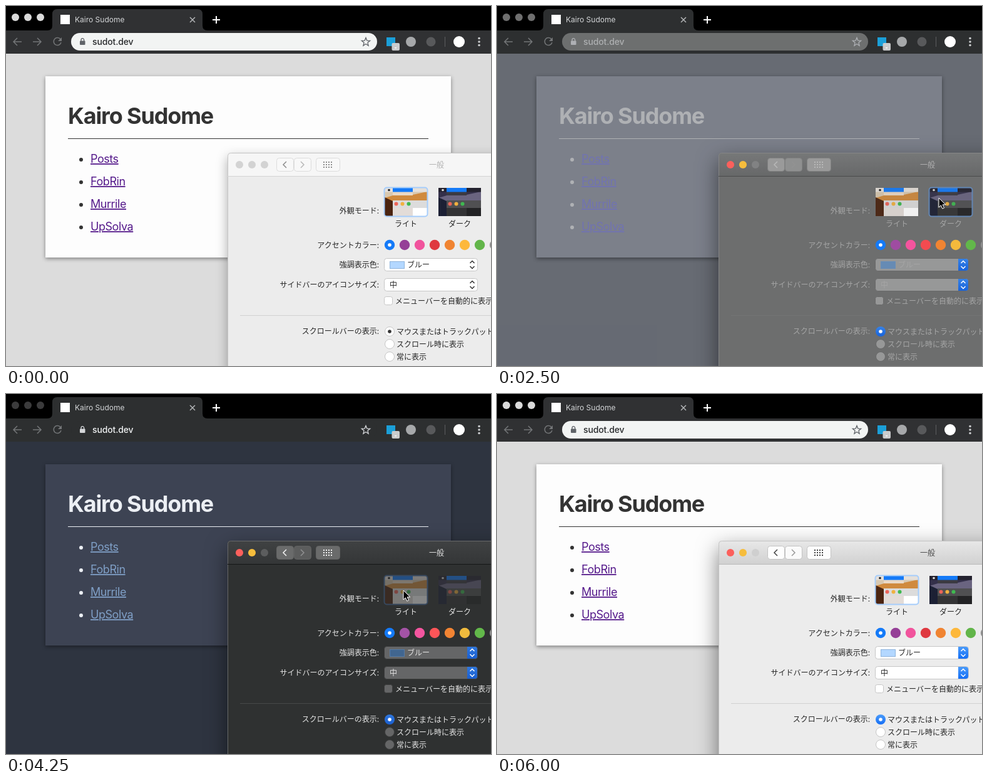
Animation of 775 by 574 pixels, one loop 7250 ms. Source, as an HTML page:

```html
<!DOCTYPE html>
<html lang="ja">
<head>
<meta charset="utf-8">
<title>Light and dark appearance</title>
<style>
  html, body { margin: 0; width: 100%; height: 100%; overflow: hidden; background: #000; }
  svg { display: block; width: 775px; height: 574px; }
  text { font: 12px Inter, sans-serif; white-space: pre; }
  .ja { font-family: "Noto Sans CJK JP", "Noto Sans CJK", sans-serif; font-weight: 500; }
  .link { font-size: 18px; letter-spacing: -.025em; text-decoration: underline; text-decoration-thickness: 1px; text-underline-offset: 2px; }
  .title { font-size: 36px; font-weight: 700; letter-spacing: -.032em; }
  .url { font-size: 14px; font-weight: 500; letter-spacing: -.01em; }
</style>
</head>
<body>
<svg id="stage" viewBox="0 0 775 574"></svg>
<script>
const light = {
  id: 'light', lamp: '#dadada', bar: '#303133', omni: '#f2f4f3', url: '#26282a', icon: '#5f6368',
  page: '#dcdcdc', card: '#fdfdfd', cardShadow: .42, ink: '#333', link: '#551a8b',
  head: ['#e8e8e8', '#d1d1d1'], edge: '#b9b9b9', rim: '#c4c4c4', panel: '#ececec', rule: '#d1d1d1',
  title: '#4c4c4c', label: '#262626', off: '#cfcfcf', button: ['#fdfdfd', '#fafafa'], buttonEdge: '#c3c3c3',
  glyph: ['#444', '#9a9a9a'], field: '#fff', fieldEdge: '#c6c6c6', blue: ['#4a9bfa', '#146ef5'],
  swatch: '#b3d7ff', swatchEdge: '#8fb4dc', ring: '#a6cdfb',
  accents: ['#147af8', '#953f97', '#f1549d', '#df3940', '#f08432', '#fdb83b', '#62b54a', '#8f8f8f']
};
const dark = {
  id: 'dark', lamp: '#3b3b3c', bar: '#2d2f30', omni: '#2d2f30', url: '#f1f3f4', icon: '#d5d7da',
  page: '#2e3440', card: '#3d4353', cardShadow: .4, ink: '#eceff4', link: '#7f9fc6',
  head: ['#404243', '#343637'], edge: '#151616', rim: '#68696a', panel: '#2f3131', rule: '#474949',
  title: '#e2e2e2', label: '#e4e4e4', off: '#5c5d5e', button: ['#6a6b6b', '#5c5d5d'], buttonEdge: '#626363',
  glyph: ['#f2f2f2', '#8f9091'], field: '#656667', fieldEdge: '#3c3d3d', blue: ['#2f77dd', '#1a5fd0'],
  swatch: '#416690', swatchEdge: '#567ba6', ring: '#42699c',
  accents: ['#147af8', '#a453a6', '#f4559f', '#fc5558', '#f28433', '#f0bb3d', '#62b84a', '#8f8f8f']
};
// Inactive window chrome
const idle = {
  ...light, head: ['#f6f6f6', '#f6f6f6'], edge: '#d4d4d4', title: '#b2b2b2', off: '#d3d3d3',
  button: ['#f8f8f8', '#f8f8f8'], buttonEdge: '#dcdcdc', glyph: ['#8d8d8d', '#b9b9b9']
};

// start, pointer x, y, darkness, thumbnail opacity, selected mode, window active
const steps = [
  [0, -50, 0, 0, 1, 0, 0],
  [250, 774, 183, 0, 1, 0, 0],
  [500, 717, 228, 0, 1, 0, 0],
  [750, 631, 302, 0, 1, 0, 0],
  [1000, 621, 313, 0, 1, 0, 0],
  [1500, 689, 308, 0, 1, 0, 0],
  [1750, 705, 305, 0, 1, 0, 0],
  [2000, 705, 305, 0, .46, 1, 1],
  [2500, 705, 305, .67, .9, 1, 1],
  [2750, 705, 305, .98, 1, 1, 1],
  [3000, 697, 305, 1, 1, 1, 1],
  [3250, 634, 312, 1, 1, 1, 1],
  [4000, 634, 312, 1, .42, 0, 1],
  [4750, 634, 312, .2, 1, 0, 1],
  [5000, 634, 312, 0, 1, 0, 1],
  [5250, 656, 313, 0, 1, 0, 1],
  [5500, 697, 317, 0, 1, 0, 1],
  [5750, 716, 311, 0, 1, 0, 1],
  [6000, -50, 0, 0, 1, 0, 1]
];

const rect = (x, y, w, h, fill, r = 0, more = '') =>
  `<rect x="${x}" y="${y}" width="${w}" height="${h}" rx="${r}" fill="${fill}" ${more}/>`;
const disc = (x, y, r, fill, more = '') => `<circle cx="${x}" cy="${y}" r="${r}" fill="${fill}" ${more}/>`;
const line = (d, color, w = 1.5) => `<path d="${d}" fill="none" stroke="${color}" stroke-width="${w}"/>`;
const text = (x, y, str, fill, cls = '', anchor = 'start') =>
  `<text x="${x}" y="${y}" class="${cls}" fill="${fill}" text-anchor="${anchor}">${str}</text>`;
const ja = (x, mid, str, fill, anchor) => text(x, mid + 4.5, str, fill, 'ja', anchor);
const fade = (id, [a, b]) => `<linearGradient id="${id}" x2="0" y2="1"><stop stop-color="${a}"/>
  <stop offset="1" stop-color="${b}"/></linearGradient>`;
const shadow = (y, blur, a) => `style="filter:drop-shadow(0 ${y}px ${blur}px rgba(0,0,0,${a}))"`;

function browser(p) {
  const gray = '#737577';
  const star = Array.from({ length: 10 }, (_, i) => {
    const r = i % 2 ? 3 : 7, a = i * Math.PI / 5;
    return `${(575 + r * Math.sin(a)).toFixed(1)},${(57.5 - r * Math.cos(a)).toFixed(1)}`;
  }).join(' ');
  return rect(0, 0, 775, 39, '#000') + [15, 35, 55].map(x => disc(x, 18, 6, p.lamp)).join('') +
    `<path d="M66 39q8 0 8-8V13q0-8 8-8H306q8 0 8 8V31q0 8 8 8z" fill="${p.bar}"/>` +
    rect(87, 14, 15, 15, '#fff') + text(110, 26, 'Kairo Sudome', '#d3d5d7') +
    line('M294 18l8 8m0-8l-8 8', '#b4b6b8') + line('M330 22h12m-6-6v12', '#fff', 2) +
    rect(0, 39, 775, 37, p.bar) +
    line('M25 57H12m6-6l-6 6 6 6M43 57H56m-6-6l6 6-6 6', gray) +
    line('M87 53a6 6 0 1 0 1 5', gray) + `<path d="M89 50v6h-6z" fill="${gray}"/>` +
    rect(104, 43, 489, 28, p.omni, 14) +
    rect(118, 55.5, 8.5, 6.5, p.icon, 1) + line('M120 56v-2a2.3 2.3 0 0 1 4.6 0v2', p.icon, 1.3) +
    text(138, 62, 'sudot.dev', p.url, 'url') +
    `<polygon points="${star}" fill="none" stroke="${p.icon}" stroke-width="1.3"/>` +
    rect(608, 50, 14, 14, '#1b9fd8') + rect(616.5, 59, 12.5, 12, '#cbcccd', 2) + rect(621, 66, 3, 1.5, '#fff') +
    disc(647, 57, 8, '#a6a8aa') + disc(679, 57, 7.5, '#58595b') + rect(701, 49, 1, 16, '#5c5d5f') +
    disc(724, 57, 9, '#fff') + [51.5, 57, 62.5].map(y => disc(756, y, 1.8, '#c9cbcd')).join('');
}

function page(p) {
  const links = ['Posts', 'FobRin', 'Murrile', 'UpSolva'];
  return rect(0, 76, 775, 498, p.page) +
    rect(63, 112, 648, 289, p.card, 0, shadow(2, 3, p.cardShadow)) +
    text(99, 188, 'Kairo Sudome', p.ink, 'title') + rect(99, 211, 576, 1, p.ink) +
    links.map((s, i) => disc(120, 245 + i * 36, 3, p.ink) + text(135, 250 + i * 36, s, p.link, 'link')).join('');
}

// A small desktop: wallpaper, open menu and a window
function thumb(x, night) {
  const [sky, hill, cliff, bar, menu, head, side, pane] = night
    ? ['#34304a', '#6a6480', '#1c2034', '#24222f', '#3b3a42', '#505052', '#333335', '#232325']
    : ['#d8c8b0', '#d08a3e', '#4b2410', '#e6e0da', '#ead9c6', '#dcdcdc', '#e3dcd8', '#fff'];
  return `<svg x="${x}" y="290" width="68" height="45" viewBox="0 0 68 45">` +
    rect(0, 0, 68, 45, sky) +
    `<path d="M0 16L20 10 40 12 68 6V45H0z" fill="${hill}"/><path d="M0 15L13 21V45H0z" fill="${cliff}"/>` +
    rect(0, 0, 68, 6.5, bar) + disc(7, 3.5, 1.8, night ? '#ddd' : '#222') +
    rect(13, 6, 32, 6, menu) + rect(13, 0, 32, 6.5, '#147af8') +
    rect(13, 20, 55, 12, head) + rect(13, 32, 32, 13, side) + rect(45, 32, 23, 13, pane) +
    ['#ec6459', '#f0b13f', '#3fb950'].map((c, i) => disc(18.5 + i * 10, 25.5, 3, c)).join('') + '</svg>';
}

function select(y, p, active) {
  return rect(604.5, y - 10, 149, 20, p.field, 4, `stroke="${p.fieldEdge}"`) +
    (active ? `<path d="M737 ${y - 9.5}h12q4 0 4 4v11q0 4-4 4h-12z" fill="url(#${p.id}Blue)"/>` : '') +
    line(`M741.5 ${y - 2.5}l3.5-3.5 3.5 3.5M741.5 ${y + 2.5}l3.5 3.5 3.5-3.5`, active ? '#fff' : '#333');
}

function prefs(p, dim, chosen, active) {
  const rim = `stroke="${p.fieldEdge}"`;
  const labels = [[326, '外観モード:'], [381, 'アクセントカラー:'], [412.5, '強調表示色:'],
    [444.5, 'サイドバーのアイコンサイズ:'], [518.5, 'スクロールバーの表示:']];
  const radios = ['マウスまたはトラックパッド', 'スクロール時に表示', '常に表示'];
  const lamps = active ? ['#fc605c', '#f6bd3c', p.off] : [p.off, p.off, p.off];
  const button = (x, w, i) => rect(x + .5, 242.5, w - 1, 21, p.button[i], 4, `stroke="${p.buttonEdge}"`);
  let dots = '';
  for (let i = 0; i < 12; i++) dots += rect(507 + i % 4 * 4, 248 + (i >> 2) * 4, 2, 2, p.glyph[0]);

  return `<defs>${fade(p.id + 'Head', p.head)}${fade(p.id + 'Blue', p.blue)}</defs>` +
    rect(354, 234, 480, 400, p.panel, 5, active ? shadow(12, 17, .5) : shadow(7, 9, .32)) +
    `<path d="M354 271V239q0-5 5-5H775V271z" fill="url(#${p.id}Head)"/>` +
    line('M354.5 574V239.5q0-5 5-5H775', p.rim, 1) + rect(354, 271, 421, 1, p.edge) +
    lamps.map((c, i) => disc(373 + i * 20, 253, 6, c)).join('') +
    button(432, 28, 0) + button(460, 28, 1) + button(495, 39, 0) +
    line('M448 248l-5 5 5 5', p.glyph[0]) + line('M471 248l5 5-5 5', p.glyph[1]) + dots +
    ja(688, 253, '一般', p.title, 'middle') +
    labels.map(([y, s]) => ja(596, y, s, p.label, 'end')).join('') +
    `<g opacity="${dim}">${thumb(605, false)}${thumb(691, true)}` +
    rect(604.5 + chosen * 86, 289.5, 69, 46, 'none', 4, `stroke="${p.ring}" stroke-width="2"`) + '</g>' +
    ja(639, 347, 'ライト', p.label, 'middle') + ja(725, 347, 'ダーク', p.label, 'middle') +
    p.accents.map((c, i) => disc(613 + i * 24, 381, 8.2, c)).join('') +
    disc(613, 381, 2.8, '#fff') +
    select(412.5, p, active) + select(444.5, p, active) +
    rect(613.5, 407.5, 23, 11, p.swatch, 0, `stroke="${p.swatchEdge}"`) +
    ja(641, 412.5, 'ブルー', p.label) + ja(613, 444.5, '中', p.label) +
    rect(604.5, 463.5, 13, 13, p.field, 3, rim) + ja(622, 470.5, 'メニューバーを自動的に表示', p.label) +
    rect(374, 493, 401, 1, p.rule) +
    radios.map((s, i) => {
      const y = 519 + i * 20, on = i === 0;
      return (on && active ? disc(613, y, 8, `url(#${p.id}Blue)`) : disc(613, y, 7.5, p.field, rim)) +
        (on ? disc(613, y, 2.8, active ? '#fff' : '#333') : '') + ja(624, y, s, p.label);
    }).join('');
}

const scene = (p, dim, chosen, active) => page(p) + browser(p) + prefs(p, dim, chosen, active);
const pointer = (x, y) => `<path transform="translate(${x} ${y})" fill="#000" stroke="#fff"
  d="M1 1v15l3.4-3.2 2.4 5.4 2.7-1.2-2.4-5.2h4.8z"/>`;

const stage = document.getElementById('stage');
let shown;
function draw() {
  const t = performance.now() % 7250;
  const step = steps.findLast(s => s[0] <= t);
  if (step !== shown) {
    shown = step;
    const [, x, y, night, dim, chosen, active] = step;
    stage.innerHTML = scene(active ? light : idle, dim, chosen, active) +
      (night ? `<g opacity="${night}">${scene(dark, dim, chosen, active)}</g>` : '') + pointer(x, y);
  }
  requestAnimationFrame(draw);
}
draw();
</script>
</body>
</html>
```
